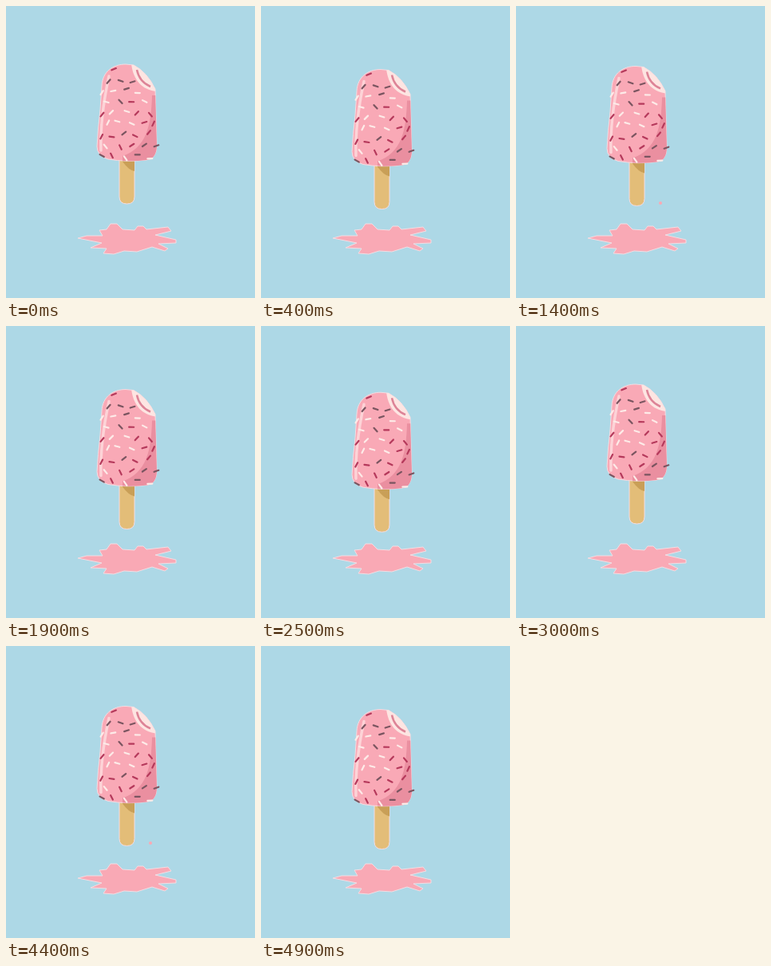
Recreate the animation shown at these times as an HTML page. Size 312x366 px, loop 5000 ms.

```html
<!DOCTYPE html>
<html lang="en">
<head>
<meta charset="utf-8">
<title>Melting ice pop</title>
<style>
  html, body { margin: 0; width: 100%; height: 100%; overflow: hidden; background: #add8e6; }
  svg { display: block; width: 100%; height: 100%; }
  .edge { stroke: #f3dde3; stroke-width: 1; stroke-linejoin: round; }
</style>
</head>
<body>
<svg viewBox="0 0 312 366">
  <defs>
    <path id="coat" d="M114 176 Q115 155 118 130 L120 100 C121 82 134 73 150 73 L160 74 Q177 83 187 104 L189 176 Q188 192 176 193 Q151 196 128 192 Q114 188 114 176Z"/>
    <clipPath id="inside"><use href="#coat"/></clipPath>
  </defs>

  <path class="edge" fill="#f9a9b5"
    d="M90 291 L101 288 L121 288 L117 281 L126 280 L131 273 H139 L146 280 L161 281 L165 276 H172 L176 280 L203 277 L207 282 L187 287 L213 293 V297 L191 298 L203 304 L199 307 L183 302 L164 308 L148 307 L135 311 L122 310 L126 304 L106 303 L120 297Z"/>

  <circle id="drop" cx="181" r="2" fill="#f9a9b5"/>

  <g id="pop">
    <path class="edge" fill="#e3bd78" d="M142 190 H161 V239 Q161 248 151.500 248 Q142 248 142 239Z"/>
    <path fill="#c99f57" d="M146 190 H161 V207 Q154 206 146 195Z"/>
    <use class="edge" href="#coat" fill="#f9a9b6"/>
    <g clip-path="url(#inside)">
      <path fill="#ea8fa0" d="M183 112 C182 150 176 178 146 188 V197 H192 V112Z"/>
      <path d="M129 88 C122 120 118 151 119 181" fill="none" stroke="#fdd3d7" stroke-width="3.500" stroke-linecap="round"/>
      <path fill="#fde5e2" d="M157 72 C159 92 170 105 188 107 V72Z"/>
      <path d="M164 80 Q167 95 181 101" fill="none" stroke="#dd8497" stroke-width="2.500"/>
    </g>
    <g id="sprinkles" stroke-width="2.200" stroke-linecap="round"></g>
  </g>
</svg>
<script>
  const LOOP = 5000, STEP = 100, BOB = 1500, DEPTH = 11.8;
  const COLORS = ['#fdebe8', '#7a5560', '#b5395b'];
  const $ = id => document.getElementById(id);

  let seed = 7;
  function random() {
    seed = seed * 16807 % 2147483647;
    return seed / 2147483647;
  }
  const jitter = size => (random() - 0.5) * size;

  // Sprinkles on a loose staggered grid, clear of the bite and the rounded corner
  function sprinkle() {
    let marks = '';
    for (let row = 0; row < 9; row++) {
      for (let col = 0; col < 5; col++) {
        const x = 119 + 15 * col + 7.5 * (row % 2) + jitter(5);
        const y = 79 + 13.7 * row + jitter(6);
        const angle = jitter(130);
        const color = COLORS[Math.floor(random() * COLORS.length)];
        if (x - y > 64 || x + y < 208) continue;
        marks += `<path d="M-3 0H3" stroke="${color}" transform="translate(${x} ${y}) rotate(${angle})"/>`;
      }
    }
    $('sprinkles').innerHTML = marks;
  }

  // Eases down, then speeds up on the way back
  function bob(t) {
    const u = t / BOB * 2;
    return DEPTH * (u < 1 ? (1 - Math.cos(Math.PI * u)) / 2 : Math.cos(Math.PI / 2 * (u - 1)));
  }

  function draw(now) {
    const t = Math.floor(now % LOOP / STEP) * STEP % BOB;
    $('pop').setAttribute('transform', `translate(0 ${bob(t)})`);
    const fall = (t - 1100) / 300;
    $('drop').setAttribute('cy', 197 + 50 * fall * fall);
    $('drop').setAttribute('visibility', fall > 0 ? 'visible' : 'hidden');
  }

  let start;
  function tick(now) {
    start ??= now;
    draw(now - start);
    requestAnimationFrame(tick);
  }
  sprinkle();
  draw(0);
  requestAnimationFrame(tick);
</script>
</body>
</html>
```
